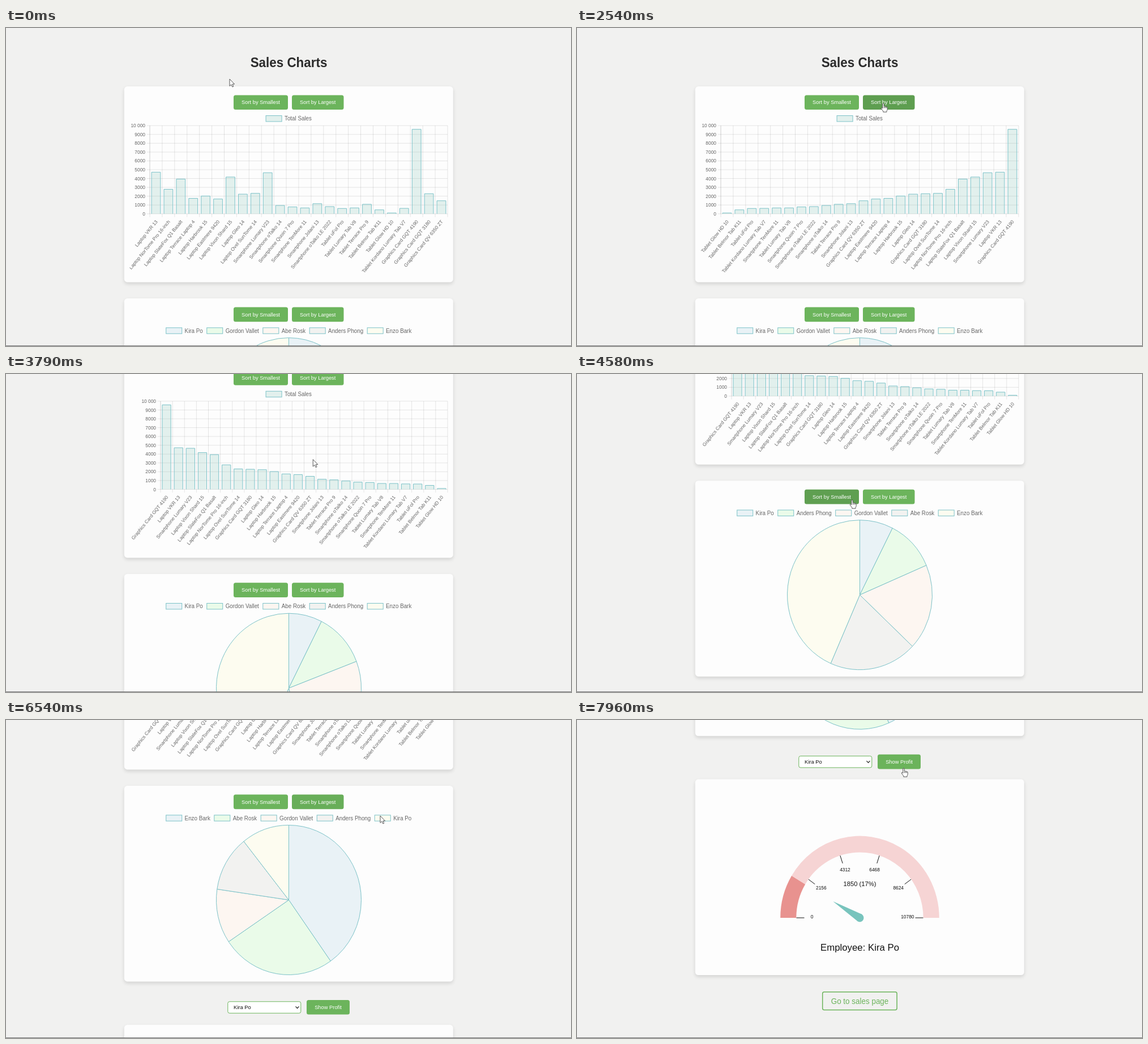
Animation of 998x561 px, one loop 8000 ms. Source, as an HTML page with a canvas:

```html
<!DOCTYPE html>
<html lang="en">
<head>
<meta charset="utf-8">
<title>Sales Charts</title>
<style>
  html, body { margin: 0; width: 100%; height: 100%; overflow: hidden; background: #f1f1f0; }
  canvas { display: block; width: 998px; height: 561px; }
</style>
</head>
<body>
<canvas id="stage" width="998" height="561"></canvas>
<script>
const ctx = document.getElementById('stage').getContext('2d');
const LOOP = 8000, MID = 499.5;
const STRETCH = 1.031; // the page is shown slightly taller than wide
const FONT = '"Liberation Sans", Arial, sans-serif';
const GREEN = '#6cb45c', TEAL = '#7cc2c8', GREY = '#666';

const products = [
  ['Laptop VKR 13', 4720], ['Laptop NorTome Pro 16-inch', 2780],
  ['Laptop SlateFox Q1 Basalt', 3940], ['Laptop Terrace Laptop 4', 1750],
  ['Laptop Harbrook 15', 2020], ['Laptop Eastmere 9420', 1680],
  ['Laptop Vixon Shard 15', 4170], ['Laptop Gleo 14', 2230],
  ['Laptop Ovel SunTome 14', 2320], ['Smartphone Lumary V23', 4660],
  ['Smartphone oTalko 14', 950], ['Smartphone Quoin 7 Pro', 780],
  ['Smartphone TenMore 11', 670], ['Smartphone Jolani 13', 1150],
  ['Smartphone oTalko LE 2022', 820], ['Tablet uFol Pro', 610],
  ['Tablet Lumary Tab V8', 671], ['Tablet Terrace Pro 9', 1080],
  ['Tablet Belmor Tab K11', 450], ['Tablet Glow HD 10', 100],
  ['Tablet Kordano Lumary Tab V7', 620], ['Graphics Card GQT 4190', 9580],
  ['Graphics Card GQT 3180', 2280], ['Graphics Card QV 6350 ZT', 1480]
];
const staff = [
  ['Kira Po', 1850], ['Gordon Vallet', 2910], ['Abe Rosk', 6660],
  ['Anders Phong', 2620], ['Enzo Bark', 10780]
];
const sliceFill = ['#e9f2f6', '#eafbe9', '#fdf6f1', '#f2f2f0', '#fdfcf0'];
const barFill = 'rgba(75,170,150,.15)';

const asc = list => [...list].sort((a, b) => a[1] - b[1]);
const desc = list => asc(list).reverse();
const barPhases = [
  { at: -5000, rows: products, left: 254 },
  { at: 1300, rows: asc(products), left: 254 },
  { at: 2560, rows: desc(products), left: 273 }
];
const piePhases = [
  { at: -5000, rows: staff },
  { at: 4400, rows: asc(staff) },
  { at: 6088, rows: desc(staff) }
];

// Buttons in page coordinates: x, y, width, label
const BUTTON_H = 25.6;
const buttons = [
  [402, 118.4, 96, 'Sort by Smallest'], [505, 118.4, 91.5, 'Sort by Largest'],
  [402, 492.6, 96, 'Sort by Smallest'], [505, 492.6, 91.5, 'Sort by Largest'],
  [531, 855, 76, 'Show Profit']
];

const wheel = [3490, 3697, 3880, 4040, 5120, 6920, 7030, 7140, 7250, 7360, 7470];
const WHEEL_STEP = 72.2, WHEEL_MS = 150;

const pointer = [
  [60, 395, 90], [1100, 480, 128], [1400, 494, 127], [1700, 494, 127],
  [2200, 541, 133], [2950, 541, 133], [3180, 543, 150], [4150, 542, 151],
  [4380, 486, 222], [4950, 486, 222], [5120, 486, 232], [5260, 486, 232],
  [5700, 552, 146], [6150, 552, 146], [6540, 661, 169], [6860, 640, 484],
  [7100, 640, 484], [7740, 634, 255], [7960, 577, 85]
];

const clamp = v => Math.max(0, Math.min(1, v));
const lerp = (a, b, k) => a + (b - a) * k;
const inOut = p => p < .5 ? 2 * p * p : 1 - 2 * (1 - p) ** 2;

const scrollAt = t =>
  wheel.reduce((y, at) => y + WHEEL_STEP * inOut(clamp((t - at) / WHEEL_MS)), 0);

function pointerAt(t) {
  const i = pointer.findIndex(p => p[0] > t);
  if (i === 0) return pointer[0].slice(1);
  if (i < 0) return pointer[pointer.length - 1].slice(1);
  const [t0, x0, y0] = pointer[i - 1], [t1, x1, y1] = pointer[i];
  const k = inOut((t - t0) / (t1 - t0));
  return [lerp(x0, x1, k), lerp(y0, y1, k)];
}

function isOver([x, y, w], t) {
  const [px, py] = pointerAt(t), dy = py + scrollAt(t) - y;
  return px >= x && px <= x + w && dy >= 0 && dy <= BUTTON_H;
}

// Share of the last 300 ms spent over the button, which gives the colour fade
function hover(button, t) {
  let n = 0;
  for (let i = 0; i < 15; i++) n += isOver(button, t - i * 20);
  return n / 15;
}

function phaseAt(phases, t) {
  let i = phases.length - 1;
  while (phases[i].at > t) i--;
  const now = phases[i], prev = phases[Math.max(0, i - 1)];
  const k = 1 - (1 - clamp((t - now.at) / 1000)) ** 4;
  const values = now.rows.map((row, j) => lerp(prev.rows[j][1], row[1], k));
  return { now, prev, k, values };
}

function text(str, x, y, size, color, align = 'center', weight = '', angle = 0) {
  ctx.save();
  ctx.translate(x, y);
  ctx.scale(1, STRETCH);
  ctx.rotate(angle);
  ctx.font = `${weight} ${size}px ${FONT}`;
  ctx.fillStyle = color;
  ctx.textAlign = align;
  ctx.textBaseline = 'alphabetic';
  ctx.fillText(str, 0, size * .35);
  ctx.restore();
}

function line(x0, y0, x1, y1) {
  ctx.beginPath();
  ctx.moveTo(x0, y0);
  ctx.lineTo(x1, y1);
  ctx.stroke();
}

function round(x, y, w, h, r) {
  ctx.beginPath();
  ctx.roundRect(x, y, w, h, r);
}

function pen(color, width) {
  ctx.strokeStyle = color;
  ctx.lineWidth = width;
}

function card(y) {
  ctx.save();
  ctx.shadowColor = 'rgba(0,0,0,.13)';
  ctx.shadowBlur = 6;
  ctx.shadowOffsetY = 3;
  ctx.fillStyle = '#fdfdfd';
  round(208.8, y, 581, 345.5, 5.6);
  ctx.fill();
  ctx.restore();
}

function drawButton(button, t) {
  const [x, y, w, label] = button, k = hover(button, t);
  ctx.fillStyle = `rgb(${lerp(108, 94, k)},${lerp(180, 158, k)},${lerp(92, 80, k)})`;
  round(x, y, w, BUTTON_H, 3.5);
  ctx.fill();
  text(label, x + w / 2, y + 12.7, 9.33, '#fff');
}

function legend(names, fills, y) {
  const BOX = 28, GAP = 4.9, PAD = 7;
  ctx.font = `9.8px ${FONT}`;
  const widths = names.map(n => BOX + GAP + ctx.measureText(n).width);
  let x = MID - (widths.reduce((a, b) => a + b) + PAD * (names.length - 1)) / 2;
  names.forEach((name, i) => {
    pen(TEAL, 1);
    ctx.fillStyle = fills[i];
    ctx.fillRect(x, y - 5.2, BOX, 10.4);
    ctx.strokeRect(x, y - 5.2, BOX, 10.4);
    text(name, x + BOX + GAP, y, 9.8, GREY, 'left');
    x += widths[i] + PAD;
  });
}

function barChart(t) {
  const TOP = 172.2, BASE = 327.8, RIGHT = 780;
  const { now, prev, k, values } = phaseAt(barPhases, t);
  const n = values.length, step = (RIGHT - now.left) / n;
  legend(['Total Sales'], [barFill], 159.8);

  pen('rgba(0,0,0,.11)', .9);
  for (let i = 0; i <= 10; i++) {
    const y = lerp(BASE, TOP, i / 10);
    line(now.left - 5.6, y, RIGHT, y);
    text(i === 10 ? '10 000' : String(i * 1000), now.left - 8, y, 8.4, GREY, 'right');
  }
  for (let i = 0; i <= n; i++) line(now.left + i * step, TOP, now.left + i * step, BASE + 5.8);
  line(now.left, TOP, now.left, BASE);

  const left = lerp(prev.left, now.left, k), pitch = (RIGHT - left) / n;
  values.forEach((v, i) => {
    const w = pitch * .72, x = left + (i + .5) * pitch - w / 2;
    const y = lerp(BASE, TOP, v / 10000);
    ctx.fillStyle = barFill;
    ctx.fillRect(x, y, w, BASE - y);
    pen(TEAL, 1);
    ctx.beginPath();
    ctx.moveTo(x, BASE);
    ctx.lineTo(x, y);
    ctx.lineTo(x + w, y);
    ctx.lineTo(x + w, BASE);
    ctx.stroke();
  });

  ctx.save();
  ctx.beginPath();
  ctx.rect(218.5, 330, 562, 115);
  ctx.clip();
  now.rows.forEach(([name], i) =>
    text(name, now.left + (i + .5) * step + 1, 340, 8.4, GREY, 'right', '', -Math.PI * 50 / 180));
  ctx.restore();
}

function pieChart(t) {
  const CY = 678.5;
  const { now, values } = phaseAt(piePhases, t);
  legend(now.rows.map(r => r[0]), sliceFill, 534);
  const total = values.reduce((a, b) => a + b);
  let a = -Math.PI / 2;
  pen(TEAL, 1);
  values.forEach((v, i) => {
    const end = a + v / total * 2 * Math.PI;
    ctx.beginPath();
    ctx.moveTo(MID, CY);
    ctx.ellipse(MID, CY, 128, 132, 0, a, end);
    ctx.closePath();
    ctx.fillStyle = sliceFill[i];
    ctx.fill();
    ctx.stroke();
    a = end;
  });
}

function select() {
  round(391.8, 857.8, 129, 20.4, 3);
  ctx.fillStyle = '#fff';
  ctx.fill();
  pen(GREEN, 1);
  ctx.stroke();
  text(staff[0][0], 402, 867.8, 9.33, '#111', 'left');
  pen('#222', 1.2);
  ctx.beginPath();
  ctx.moveTo(511.5, 866.3);
  ctx.lineTo(514.5, 869.5);
  ctx.lineTo(517.5, 866.3);
  ctx.stroke();
}

function gauge() {
  const [name, value] = staff[0], max = 10780, share = value / max;
  ctx.save();
  ctx.translate(MID, 1143.2);

  const band = (from, to, color) => {
    const a = Math.PI * (1 + from), b = Math.PI * (1 + to);
    ctx.beginPath();
    ctx.ellipse(0, 0, 140.3, 144.4, 0, a, b);
    ctx.ellipse(0, 0, 112.2, 115.6, 0, b, a, true);
    ctx.closePath();
    ctx.fillStyle = color;
    ctx.fill();
  };
  band(0, share, '#e8928f');
  band(share, 1, '#f6d4d4');

  pen('#111', 1);
  for (let i = 0; i <= 5; i++) {
    const a = Math.PI * (1 + i / 5), c = Math.cos(a), s = Math.sin(a) * STRETCH;
    line(c * 112, s * 112, c * 98, s * 98);
    text(String(max / 5 * i), c * 84.3, s * 84.3 - 2.4, 8.4, '#111');
  }
  text(`${value} (${Math.round(share * 100)}%)`, 0, -59.7, 11.2, '#111');
  text('Employee: ' + name, 0, 52, 16.8, '#111');

  ctx.scale(1, STRETCH);
  ctx.rotate(Math.PI * (1 + share));
  ctx.fillStyle = '#78c4bd';
  ctx.beginPath();
  ctx.arc(0, 0, 7, -Math.PI / 2, Math.PI / 2, true);
  ctx.arc(0, 0, 7, Math.PI / 2, -Math.PI / 2, true);
  ctx.fill();
  ctx.beginPath();
  ctx.moveTo(0, -7);
  ctx.lineTo(55, 0);
  ctx.lineTo(0, 7);
  ctx.fill();
  ctx.restore();
}

const arrow = new Path2D('M0 0V12.4L2.9 9.8L4.9 14L6.8 13.1L4.9 9H8.6Z');
const hand = new Path2D('M-1.2 .8Q0-.7 1.2 .8V5.2Q2.6 4.5 3.3 5.7Q4.8 5 5.4 6.2Q7 5.8 7.2 7.4'
  + 'V10.5Q7 12.5 6 13.5V15.2H-.2V13.7L-3.6 9.2Q-4 7.5-2.6 7.6L-1.2 9Z');

function drawPointer(t) {
  const [x, y] = pointerAt(t), over = buttons.some(b => isOver(b, t));
  const shape = over ? hand : arrow;
  ctx.save();
  ctx.translate(x, y);
  ctx.fillStyle = '#fff';
  ctx.fill(shape);
  pen('#444', .9);
  ctx.lineJoin = 'round';
  ctx.stroke(shape);
  if (over) for (const fx of [1.4, 3.4, 5.4]) line(fx, 6, fx, 8.4);
  ctx.restore();
}

function draw(t) {
  ctx.fillStyle = '#f1f1f0';
  ctx.fillRect(0, 0, 998, 561);
  ctx.save();
  ctx.translate(0, -scrollAt(t));
  text('Sales Charts', MID, 60.5, 22.4, '#2b2b2b', 'center', 'bold');
  [103, 477, 898.8].forEach(card);
  barChart(t);
  pieChart(t);
  select();
  gauge();
  buttons.forEach(b => drawButton(b, t));
  round(433.7, 1274, 131.4, 31.6, 3);
  pen(GREEN, 1.5);
  ctx.stroke();
  text('Go to sales page', MID, 1290, 13.44, GREEN);
  ctx.restore();
  drawPointer(t);
  ctx.fillStyle = '#777';
  ctx.fillRect(0, 560, 998, 1);
}

const start = performance.now();
function tick() {
  draw((performance.now() - start) % LOOP);
  requestAnimationFrame(tick);
}
tick();
</script>
</body>
</html>
```
